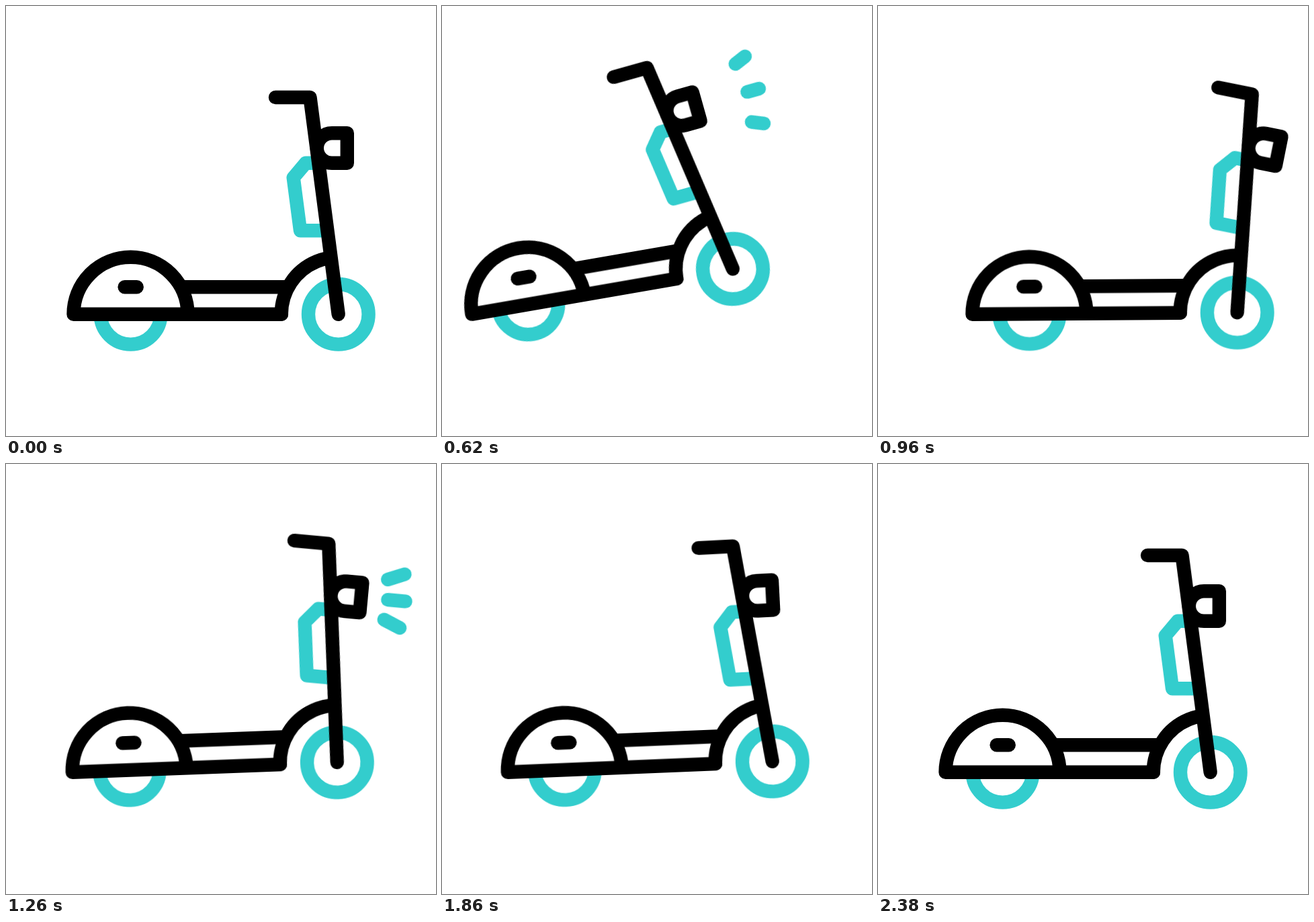
Animation of 640 by 640 pixels, one loop 2420 ms. Source, as an HTML page without scripts:

```html
<!DOCTYPE html>
<html lang="en">
<head>
<meta charset="utf-8">
<title>Electric scooter</title>
<style>
  @property --tilt { syntax: "<angle>"; inherits: true; initial-value: 0deg; }
  @property --steer { syntax: "<angle>"; inherits: true; initial-value: 0deg; }
  @property --head { syntax: "<number>"; inherits: true; initial-value: 0; }
  @property --tail { syntax: "<number>"; inherits: true; initial-value: 0; }

  html, body { margin: 0; width: 100%; height: 100%; overflow: hidden; background: #fff; }
  svg { display: block; width: 100vw; height: 100vh; }

  .line {
    fill: none;
    stroke: #000;
    stroke-width: 20.4px;
    stroke-linejoin: round;
  }
  .round { stroke-linecap: round; }
  .teal { stroke: #33cdcd; }

  .scooter, .rays {
    animation: 2420ms cubic-bezier(.333, 0, .667, 1) infinite;
  }
  .scooter { animation-name: drive, tilt, steer; }
  .body { transform-origin: 100px 458.8px; transform: rotate(var(--tilt)); }

  /* The steering angle is absolute, so the body tilt is taken out again. */
  .handle, .unsteer { transform-origin: 494.8px 458.8px; }
  .handle { transform: rotate(calc(var(--steer) - var(--tilt))); }
  .unsteer { transform: rotate(calc(var(--tilt) - var(--steer))); }

  .rays { animation-name: grow, erase, flash; }
  .rays line {
    stroke-dasharray: calc((var(--head) - var(--tail)) * 1px) 200px;
    stroke-dashoffset: calc(var(--tail) * -1px);
  }

  @keyframes drive {
    0%, 79.34%, 100% { transform: translateX(0); }
    19.83% { transform: translateX(-82.5px); }
    39.26% { transform: translateX(40px); }
    64.05% { transform: translateX(-39px); }
  }
  @keyframes tilt {
    0%, 4.2%, 41.74%, 83.06%, 100% { --tilt: 0deg; }
    23.97% { --tilt: -10.1deg; }
    68.18% { --tilt: -6.3deg; }
  }
  @keyframes steer {
    0%, 4.71%, 98.76%, 100% { --steer: 0deg; }
    25.41% { --steer: -15.7deg; }
    42.15% { --steer: 13deg; }
    68.18% { --steer: -10.7deg; }
    86.78% { --steer: 6.4deg; }
  }
  @keyframes grow {
    0%, 42.69% { --head: 0; }
    19.83%, 42.68%, 62.5%, 100% { --head: 57; }
  }
  @keyframes erase {
    0%, 14.01%, 42.69%, 56.69% { --tail: 0; }
    32.73%, 42.68%, 75.41%, 100% { --tail: 57; }
  }
  @keyframes flash {
    0%, 32.5%, 75.1%, 100% { opacity: 0; animation-timing-function: step-end; }
    .4%, 42.8% { opacity: 1; animation-timing-function: step-end; }
  }
</style>
</head>
<body>
<svg viewBox="0 0 640 640">
  <clipPath id="behind-stem">
    <path d="M0 0H434.7L518.4 640H0z"/>
  </clipPath>

  <g class="scooter">
    <g class="body">
      <path class="line teal" d="M140.7 458.8a44.8 44.8 0 0 0 89.6 0"/>
      <circle class="line teal" cx="494.8" cy="458.8" r="44.8"/>

      <path class="line round" d="M270.5 458.8a85 85 0 0 0-170 0H410"/>
      <path class="line" d="M262 418.3H418"/>
      <path class="line round" d="M176.6 418.3H194.7"/>
      <g class="handle" clip-path="url(#behind-stem)">
        <path class="line round unsteer" d="M409.8 458.8a85 85 0 0 1 145.1-60.1"/>
      </g>

      <g class="handle">
        <path class="line teal" d="M476 334.3H438L427.7 255.5 446 233.8H464"/>
        <path class="line" d="M485 189.3H507.8V233.7H485a22.2 22.2 0 0 1 0-44.4z"/>
        <path class="line round" d="M401 136H452.5L494.7 458.8"/>
        <g class="rays">
          <line class="line round teal" x2="57" transform="translate(545 181) rotate(-22.5)"/>
          <line class="line round teal" x2="57" transform="translate(547.8 211)"/>
          <line class="line round teal" x2="57" transform="translate(545 241) rotate(22.5)"/>
        </g>
      </g>
    </g>
  </g>
</svg>
</body>
</html>
```
